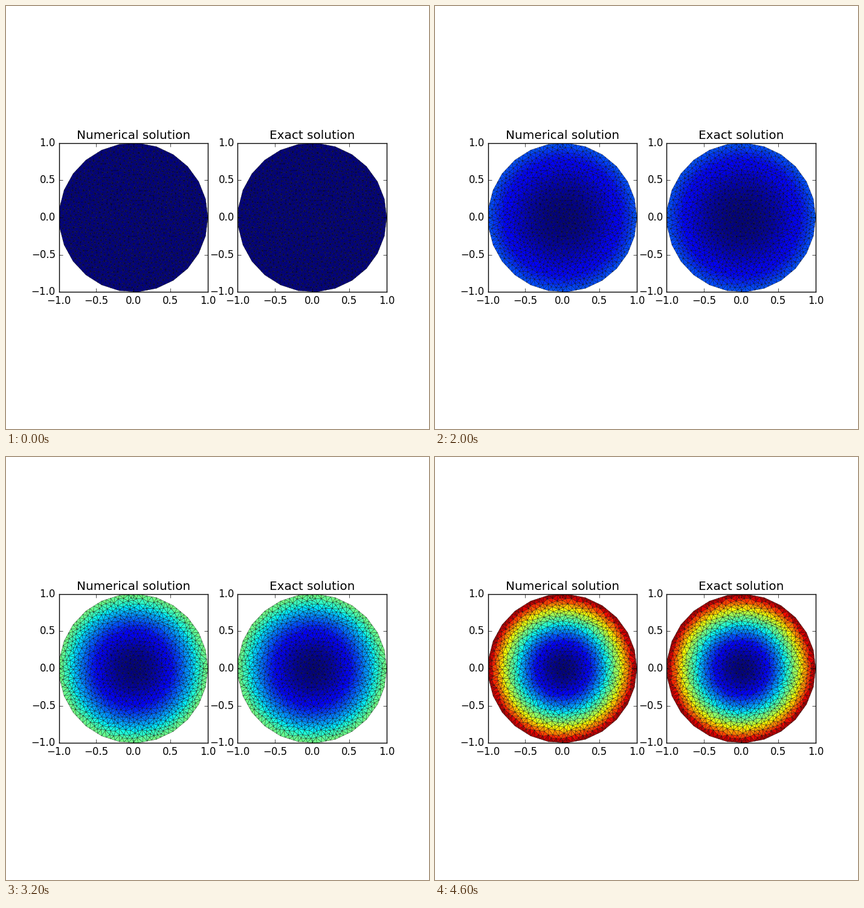
Animation, 700 px wide and 700 px high, one loop 4800 ms. Source, as a matplotlib script:

```python
import numpy as np
import matplotlib.pyplot as plt
from matplotlib.animation import FuncAnimation
from matplotlib.tri import Triangulation

plt.style.use("classic")
plt.rcParams["font.family"] = "DejaVu Sans"

FRAMES, INTERVAL = 24, 200
SIDES, SPLIT = 25, 4      # polygon sides, mesh edges per side
SPACING = 0.046           # minimum distance between mesh points
U_MAX = 0.985


def polygon_mesh():
    """Irregular triangle mesh of a regular polygon in the unit circle."""
    step = 2 * np.pi / SIDES
    corners = np.exp(1j * step * np.arange(SIDES))
    s = np.arange(SPLIT) / SPLIT
    rim = (corners[:, None] * (1 - s) + np.roll(corners, -1)[:, None] * s).ravel()

    rng = np.random.default_rng(4)
    cand = rng.uniform(-1, 1, 30000) + 1j * rng.uniform(-1, 1, 30000)
    # distance from the centre along the normal of the nearest side
    depth = np.abs(cand) * np.cos(np.angle(cand) % step - step / 2)
    cand = cand[depth < np.cos(step / 2) - 0.8 * SPACING]

    pts = np.empty(len(rim) + len(cand), complex)
    count = len(rim)
    pts[:count] = rim
    for p in cand:
        if np.abs(pts[:count] - p).min() > SPACING:
            pts[count] = p
            count += 1
    x, y = pts[:count].real, pts[:count].imag

    # drop flat slivers along the straight sides
    tris = Triangulation(x, y).triangles
    a, b, c = pts[tris].T
    area = 0.5 * np.abs(((b - a).conj() * (c - a)).imag)
    return Triangulation(x, y, tris[area > 1e-5])


mesh = polygon_mesh()
shape = (mesh.x**2 + mesh.y**2)[mesh.triangles].mean(axis=1)


def solution(frame):
    t = (frame + 1) / FRAMES
    return t**2 * shape


fig, axes = plt.subplots(1, 2, figsize=(7, 7), dpi=100, facecolor="white")
plots = []
for ax, title in zip(axes, ("Numerical solution", "Exact solution")):
    plots.append(ax.tripcolor(mesh, facecolors=solution(0), cmap="jet",
                              vmin=0, vmax=U_MAX, edgecolors="k"))
    ax.set(xlim=(-1, 1), ylim=(-1, 1), aspect="equal", title=title)
    ax.set_xticks(np.linspace(-1, 1, 5))
    ax.set_yticks(np.linspace(-1, 1, 5))


def update(frame):
    for plot in plots:
        plot.set_array(solution(frame))
    return plots


anim = FuncAnimation(fig, update, frames=FRAMES, interval=INTERVAL,
                     repeat=True, repeat_delay=0, blit=False)
plt.show()
```
